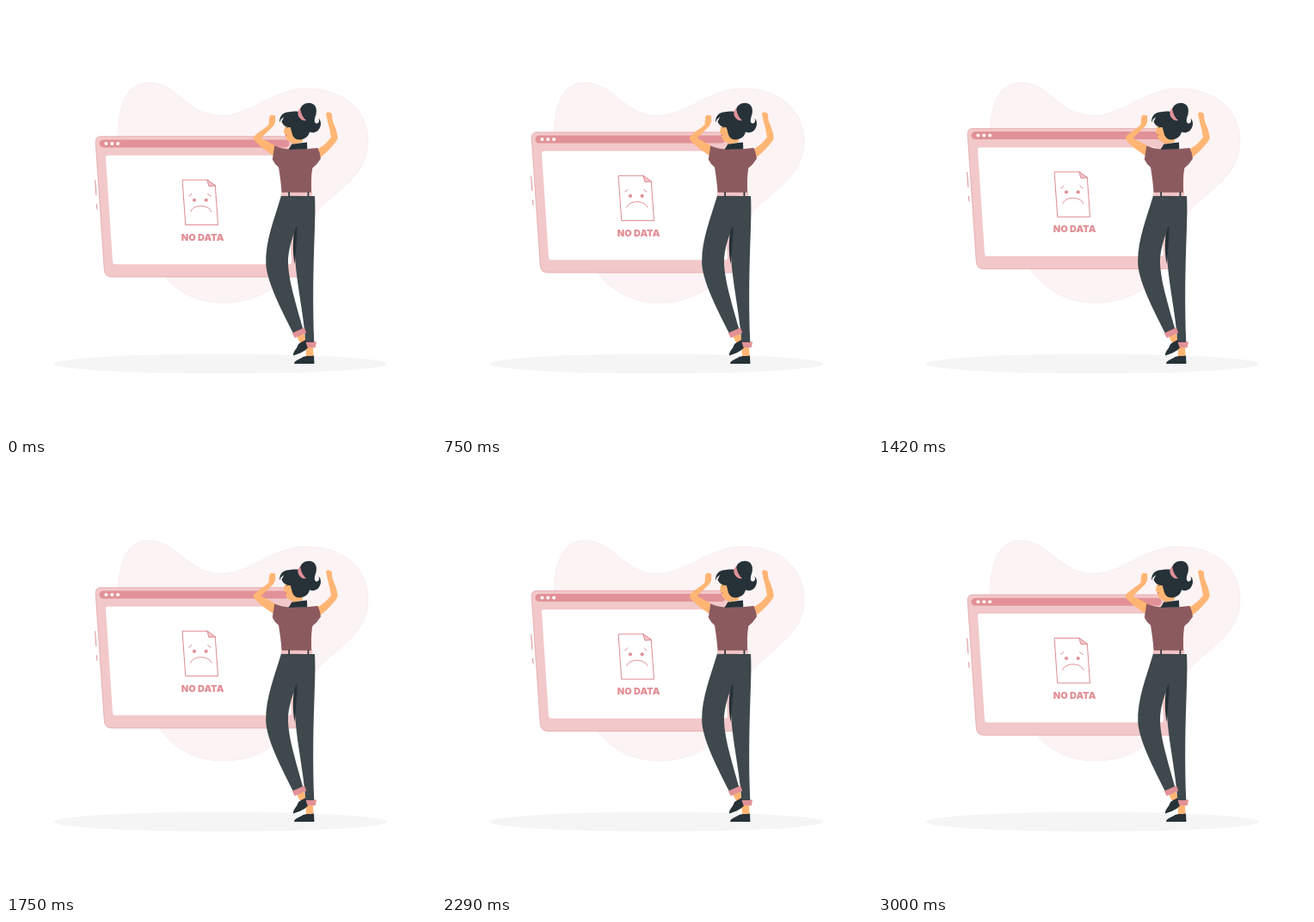
Write an HTML page that moves like this. It is 500 by 500 pixels and loops after 3.04 s.

```html
<!DOCTYPE html>
<html lang="en">
<head>
<meta charset="utf-8">
<title>No data</title>
<style>
  html, body { margin: 0; width: 100%; height: 100%; overflow: hidden; background: #fff; }
  svg { display: block; width: 100vw; height: 100vh; }
  .skin { fill: #ffb573; }
  .dark { fill: #263238; }
  .pants { fill: #3e484d; }
  .rose { fill: #e19197; }
  .line { fill: none; stroke: #de8c92; stroke-width: 1; stroke-linecap: round; stroke-linejoin: round; }
  text { font: 900 11px Inter, "Open Sans", sans-serif; fill: #e18f95; text-anchor: middle; }
</style>
</head>
<body>
<svg viewBox="0 0 500 500">
  <path fill="#fcf3f4" stroke="#f5e3e5" stroke-width=".5" d="M130.500 152C130 118 139 89 166 89C200 89 211 127.500 250 127.500C285 127.500 309 96 350 96C391 96 421 120 421 157C421 199 384 213 361 240C340 264 337 290 325 310C312 333 284 345 252 345C217 345 196 329 181 311C150 274 131 210 130.500 152Z"/>
  <ellipse cx="249.500" cy="416" rx="194" ry="11.300" fill="#f5f5f5"/>

  <g id="window">
    <path fill="#f2c8ca" stroke="#db9298" stroke-width=".6" d="M110 152H328Q333.500 152 334 158L344 309Q344 315.300 338 315.300H123Q115 315.300 114.300 307L104.200 159Q104 152 110 152Z"/>
    <rect class="rose" x="108.500" y="155.700" width="221" height="9" rx="4.500"/>
    <g fill="#fff">
      <circle cx="116.400" cy="160.200" r="2"/>
      <circle cx="123.300" cy="160.200" r="2"/>
      <circle cx="130.100" cy="160.200" r="2"/>
      <path d="M118.500 174H321Q323.800 174 324 177L332 297.500Q332 300.500 329 300.500H127Q124.200 300.500 124 297.500L116 177Q115.800 174 118.500 174Z"/>
    </g>
    <g class="line">
      <path d="M103.700 203L104.900 220M105.500 231L106 236.500"/>
      <path d="M205.500 202.500H233.800L243.300 209.300L246.500 254.800H209.100Z"/>
      <path fill="#f2c8ca" d="M233.800 202.500L236 209.800L243.300 209.300Z"/>
      <path d="M212.800 221.300Q214.700 220.700 215.800 218.600M234.700 218.600Q236 220.700 238 221.300M214.800 239.300C217 230.800 236 230.500 238.800 239.300"/>
    </g>
    <circle class="rose" cx="219" cy="226" r="2.100"/>
    <circle class="rose" cx="232.700" cy="226" r="2.100"/>
    <text x="228.600" y="273">NO DATA</text>
  </g>

  <g id="woman">
    <!-- feet -->
    <path class="skin" d="M348.500 396H357L357.500 408H349ZM338 384L346 380L349.500 389L343 393Z"/>
    <path class="dark" d="M335 416C335.500 412 340 411.500 344 409C348 406 353 407.500 358 406.500L358.500 416Z"/>
    <path class="dark" d="M334 406.500C334 401 337.500 399.500 339 395.500C340.500 390.500 346 391 350 386.500L355.300 391.500C352 398 346 402 341 404Z"/>
    <!-- legs -->
    <path class="rose" d="M348.500 390.500L361 390.500L359.800 397.200L350.500 397Z"/>
    <path class="pants" d="M332 221H359C361 252 355 304 358.300 391H348.500C345 350 338 325 336 290Z"/>
    <path class="dark" d="M338.500 257C338.500 272 336.500 287 335.800 300C332.800 286 333.500 270 336 256Z"/>
    <path class="pants" d="M320 220.500H345C346 245 328.500 270 328 297C328 317 337 346 345.500 376L334.500 381.500C321 355 304 322 302.300 301C301 274 312 248 320 220.500Z"/>
    <path class="rose" d="M332.800 380.300L347 374L349.300 380L335.800 386Z"/>
    <!-- arms -->
    <path class="skin" d="M306.200 129L308 126.800L313 127.200L313.300 134.500L311 139.500L296.500 153.500L314 163L312 174.500C304 170 294 162 289 156.500Q286.700 153.500 289 151C294 146 301 142.500 305.500 138Z"/>
    <path class="skin" d="M372 125L374.500 123L378.800 125L379.600 133C382 139 385 146 385.600 152Q386 155 383.500 158C378 165 371 172 364.500 176.500L361.500 167C368 163.500 374 158.500 378 152.500C377 146 375.500 140 373.800 133.500Z"/>
    <!-- torso -->
    <path fill="#8b5a5f" d="M312.300 162.500Q321 166.500 331 166.500L350 166.200L362.500 165Q365 170 366 177.500Q362 184 356.300 188.500C354.500 199 355 208 355.200 217H320.500C320 207 318.500 197 317 187.500Q312.500 184 309.800 178.500Z"/>
    <path fill="#f2c3c5" d="M320.300 216.700H356L356.300 220.800H319.800Z"/>
    <path class="dark" d="M328.300 216.200H330V221.500H328.300ZM350.600 216.200H352.300V221.500H350.600Z"/>
    <path class="dark" d="M328.500 167L332.500 160.500L350 158.500L350.300 166.500Z"/>
    <!-- head -->
    <path class="skin" d="M326 136L323.700 143L322.800 147.500L324.600 148.500C325 153 327 157 330.500 158.200L335 160.500L345 158L346 140Z"/>
    <path fill="#d9716f" d="M324.600 149L326.800 149.600L325.200 151.300Z"/>
    <path class="dark" d="M325.200 142L327.700 140.700L327.500 141.500Z"/>
    <path class="dark" d="M318.200 135.500C317.500 128 322 123.500 329 123.200C336 121.500 345 122.500 350 127.500C356 134 355 146 350.500 151.500C346 156 339 156.500 335.500 153.500C332 150 332.500 145 330.500 141C326 141.500 322 138.500 320.500 134.500Q322.500 131 323 129Q319.500 131 318.200 135.500Z"/>
    <path class="dark" d="M342 121C343 114 351 111 357 114C362 117 361.500 124 359.500 129C358 134 359 137 362 136.500C364.500 135.500 364.500 133 363.300 130.500C367 133.500 367 140 363 144.500C359 148.500 353.500 148 350.500 144L345 132Z"/>
    <path class="rose" d="M341.800 119C339 122 338.500 126 341 129.500C343 132.500 346 134 349 133C345.500 130 343 125 341.800 119Z"/>
  </g>
</svg>
<script>
  const LOOP = 3040, FPS = 24, STEPS = 73, RISE = 10;
  const panel = document.getElementById("window");

  // The window floats up and down at a constant speed, in discrete steps.
  function draw(time) {
    const step = Math.floor((time % LOOP + 5) * FPS / 1000);
    const phase = (step + 1) % STEPS / STEPS;
    const lift = RISE * (1 - Math.abs(1 - 2 * phase));
    panel.setAttribute("transform", `translate(0 ${-lift})`);
  }

  const start = performance.now();
  function tick() {
    draw(performance.now() - start);
    requestAnimationFrame(tick);
  }
  tick();
</script>
</body>
</html>
```
